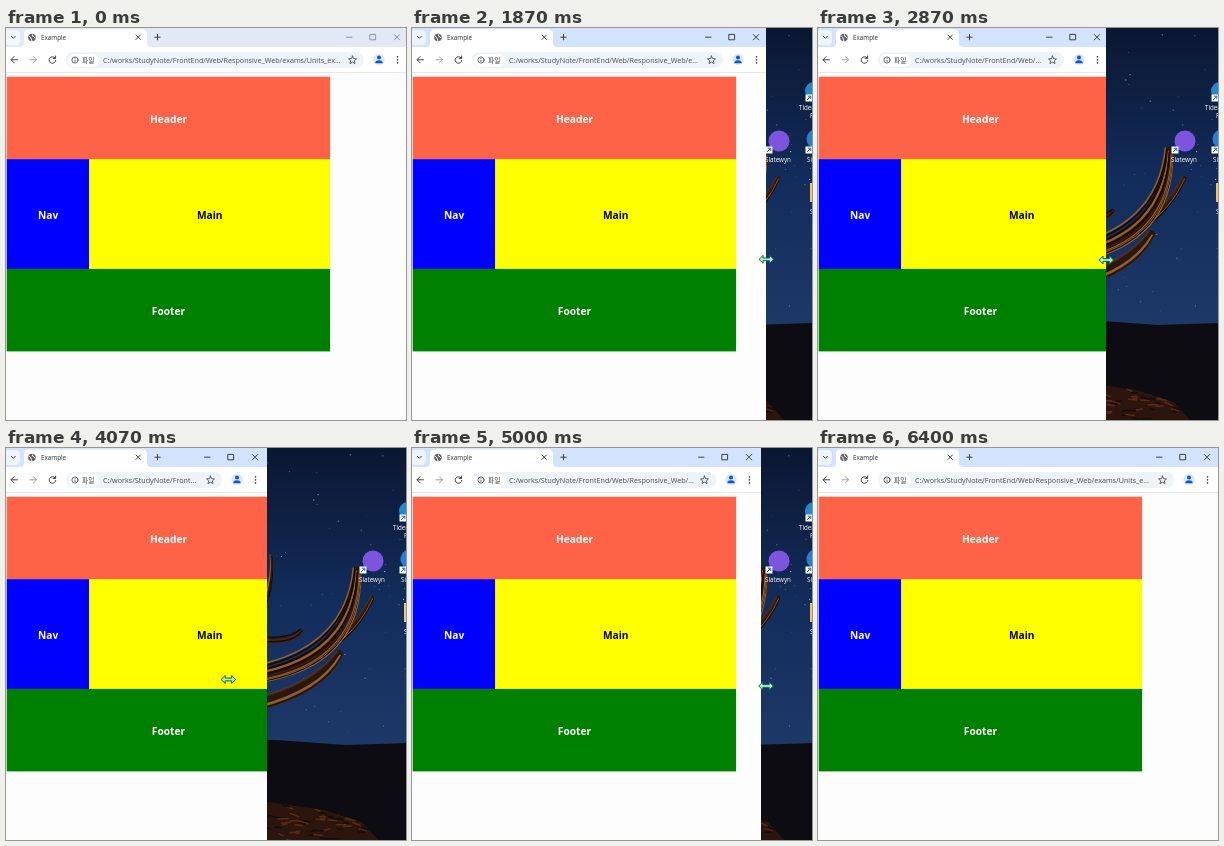
Animation of 400x392 px, one loop 7 s. Source, as an HTML page:

```html
<!DOCTYPE html>
<html lang="en">
<head>
<meta charset="utf-8">
<title>Window resize</title>
<style>
  html, body { margin: 0; width: 100%; height: 100%; overflow: hidden; background: #fefdfe; }
  body { position: relative; font-family: "Open Sans", "Noto Sans", sans-serif; }
  svg, div { position: absolute; }
  svg { left: 0; top: 0; overflow: hidden; }
  #win { left: 0; top: 0; height: 392px; overflow: hidden; background: #fefdfe; }
  #bar { left: 0; top: 0; height: 45px; }
  .strip { left: 0; right: 0; top: 0; height: 19px; background: #d3e3fd; }
  .idle .strip { background: #e2e9f5; }
  .idle .ctl { opacity: .5; }
  .tools { left: 0; right: 0; top: 19px; height: 26px; background: #fff; border-bottom: 1px solid #e3e7ee; box-sizing: border-box; }
  .field { left: 60px; right: 45px; top: 24px; height: 16px; border-radius: 8px; background: #eef2f9; }
  .chip { left: 62px; top: 25.5px; width: 31px; height: 13px; border-radius: 6.5px; background: #fff; }
  .file { left: 76px; top: 27px; font: 6.7px/10px "Noto Sans CJK KR", "Noto Sans CJK", sans-serif; color: #333; white-space: nowrap; }
  .url { left: 97px; right: 67px; top: 26.5px; font-size: 7.2px; line-height: 11px; color: #4a4d52; white-space: nowrap; overflow: hidden; text-overflow: ellipsis; }
  .tab { left: 35px; top: 4.5px; font-size: 6.3px; line-height: 10px; color: #2b2d31; }
  .right { left: auto; right: 0; }
  .page { font-weight: 700; font-size: 10.2px; text-anchor: middle; }
  .label { font-size: 6.25px; fill: #fff; }
  .line { fill: none; stroke: #3c4043; stroke-linecap: round; stroke-linejoin: round; }
</style>
</head>
<body>
<svg width="400" height="392">
  <defs>
    <linearGradient id="sky" x2="0" y2="1">
      <stop offset="0" stop-color="#0b1731"/>
      <stop offset=".5" stop-color="#122c5b"/>
      <stop offset="1" stop-color="#1d3967"/>
    </linearGradient>
    <g id="link">
      <rect width="7" height="7" fill="#fff"/>
      <path d="M1.5 5.5 5 2M2.4 1.7H5.3V4.6" fill="none" stroke="#2467b8"/>
    </g>
    <clipPath id="rock"><path d="M200 354H262L318 362 356 374 372 392H200Z"/></clipPath>
  </defs>
  <rect width="400" height="300" fill="url(#sky)"/>
  <g id="stars" fill="#c9d8f2"></g>
  <path d="M200 292H270L340 297 400 295V392H200Z" fill="#0d0c12"/>
  <g id="ground" clip-path="url(#rock)"><rect y="350" width="400" height="42" fill="#2c150d"/></g>
  <g id="tree" fill="none" stroke-linecap="round"></g>
  <circle cx="367" cy="113" r="10.5" fill="#7d55dc"/>
  <circle cx="402" cy="63" r="9" fill="#2489ca"/>
  <circle cx="404" cy="111" r="9.5" fill="#2c7fd0"/>
  <rect x="398" y="155" width="18" height="19" fill="#f0c46c"/>
  <use href="#link" x="353.5" y="118.5"/>
  <use href="#link" x="393.5" y="66.5"/>
  <use href="#link" x="393.5" y="118.5"/>
  <g class="label">
    <text x="353" y="133.5">Slatewyn</text>
    <text x="387" y="81.5">Tidemark</text>
    <text x="398" y="90">Pen</text>
    <text x="395" y="133.5">Sill</text>
    <text x="398" y="185.5">Sets</text>
  </g>
</svg>

<div id="win">
  <svg class="page" width="400" height="392">
    <rect x=".7" y="48.7" width="323.4" height="83" fill="tomato"/>
    <rect x=".7" y="131.2" width="83" height="110" fill="blue"/>
    <rect x="83.1" y="131.2" width="241" height="110" fill="yellow"/>
    <rect x=".7" y="240.9" width="323.4" height="82.5" fill="green"/>
    <g fill="#fff">
      <text x="162.5" y="94.5">Header</text>
      <text x="42.2" y="190.5">Nav</text>
      <text x="203.7" y="190.5" fill="#000">Main</text>
      <text x="162.5" y="286.5">Footer</text>
    </g>
  </svg>
  <div id="bar">
    <div class="strip"></div>
    <div class="tools"></div>
    <div class="field"></div>
    <div class="chip"></div>
    <svg width="170" height="45">
      <rect x="-2" y="2" width="16" height="15" rx="4.5" fill="#fff" opacity=".6"/>
      <path d="M14 19Q18 19 18 15V6Q18 1.5 22.5 1.5H136.5Q141 1.5 141 6V15Q141 19 145 19Z" fill="#fff"/>
      <circle cx="26" cy="9.5" r="3.8" fill="#5f6368"/>
      <path d="M23.2 8.2Q25 9 25.4 11.2L26 13M26.4 6.4Q26 8.6 28 8.8L29.2 10.4" fill="none" stroke="#fff"/>
      <g class="line">
        <path d="M5.3 8.3 7.3 10.3 9.3 8.3"/>
        <path d="M130 7 134.4 11.4M134.4 7 130 11.4M148.8 9.2H154.2M151.5 6.5V11.9"/>
        <path d="M11.5 31.8H5.2M8.2 28.6 5 31.8 8.2 35"/>
        <path d="M24 31.8H30.3M27.3 28.6 30.5 31.8 27.3 35" stroke="#9a9da1"/>
        <path d="M49 29.8A3.3 3.3 0 1 0 49.8 32.4M49.6 28V30.4H47.2"/>
        <circle cx="69" cy="32" r="3.1" stroke-width=".8"/>
        <path d="M69 32V33.6M69 30.4V30.5" stroke-width=".8"/>
      </g>
    </svg>
    <div class="tab">Example</div>
    <div class="file">파일</div>
    <div class="url">C:/works/StudyNote/FrontEnd/Web/Responsive_Web/exams/Units_exam.html</div>
    <svg class="right" width="70" height="45">
      <g class="line ctl">
        <path d="M7.5 9.2H13"/>
        <rect x="31.2" y="6.4" width="5.4" height="5.4"/>
        <path d="M55.3 6.5 60.7 11.9M60.7 6.5 55.3 11.9"/>
      </g>
      <path class="line" stroke-width=".8" d="M13.5 28 14.6 30.7 17.5 30.9 15.3 32.8 16 35.6 13.5 34.1 11 35.6 11.7 32.8 9.5 30.9 12.4 30.7Z"/>
      <circle cx="40" cy="31.5" r="5.6" fill="#d9e6fc"/>
      <g fill="#0b57d0">
        <circle cx="40" cy="29.4" r="2"/>
        <path d="M36.4 35.2V34Q37 32.2 40 32.2T43.6 34V35.2Z"/>
      </g>
      <path class="line" d="M58.5 28.8V35" stroke-width="1.7" stroke-dasharray="0 3"/>
    </svg>
  </div>
</div>

<svg width="400" height="392">
  <path id="cursor" d="M-7.3 0-3.2-4V-1.4H3.2V-4L7.3 0 3.2 4V1.4H-3.2V4Z" fill="#a9efcb" stroke="#176349" stroke-linejoin="round"/>
</svg>

<script>
  const LOOP = 7000, FPS = 15, MIN_WIDTH = 261;
  const $ = id => document.getElementById(id);

  let seed = 11;
  const rand = (a, b) => a + (b - a) * (seed = seed * 16807 % 2147483647) / 2147483647;

  function add(parent, tag, attrs) {
    const el = document.createElementNS("http://www.w3.org/2000/svg", tag);
    for (const name in attrs) el.setAttribute(name, attrs[name]);
    $(parent).append(el);
  }

  for (let i = 0; i < 60; i++) {
    add("stars", "circle", { cx: rand(255, 400), cy: rand(0, 285), r: rand(.25, .7), opacity: rand(.3, .8) });
  }

  const woods = ["#150b08", "#2b170e", "#4d2b16", "#95602f"];
  const wood = () => woods[Math.floor(rand(0, woods.length))];

  // A branch is a dark core with loose fibres along one curve.
  function branch(x, y, cx, cy, ex, ey, size) {
    const path = (a, b) => `M${x + a / 2} ${y + b / 2}Q${cx + a} ${cy + b} ${ex + a} ${ey + b}`;
    add("tree", "path", { d: path(0, 0), stroke: woods[1], "stroke-width": size * .7 });
    for (let i = 0; i < size * 1.5; i++) {
      const off = rand(-size, size) / 2;
      add("tree", "path", { d: path(off, off + rand(-1, 1)), stroke: wood(), "stroke-width": rand(.8, 1.8) });
    }
  }
  branch(265, 108, 268, 130, 258, 160, 3);
  branch(295, 183, 286, 194, 255, 192, 6);
  branch(366, 150, 345, 195, 290, 216, 6);
  branch(351, 124, 347, 208, 255, 226, 15);
  branch(333, 206, 312, 240, 250, 256, 11);

  for (let i = 0; i < 70; i++) {
    const x = rand(250, 370), y = rand(354, 392);
    add("ground", "path", { d: `M${x} ${y}l${rand(4, 12)} ${rand(-2, 4)}`, stroke: i % 2 ? "#5a2c17" : "#160b09", "stroke-width": 1.5 });
  }

  // Pointer drag: [ms, x, y], linear in between.
  const drag = [[0, 405, 229], [530, 405, 229], [1330, 386, 230], [2330, 327, 232.5], [2870, 288, 232],
    [3600, 213, 232], [4000, 213, 231], [5000, 354, 238], [6200, 403, 236.5], [LOOP, 403, 236.5]];

  function pointer(t) {
    t = Math.max(t, 0);
    const i = drag.findIndex(k => k[0] > t);
    const [t0, x0, y0] = drag[i - 1], [t1, x1, y1] = drag[i];
    const p = (t - t0) / (t1 - t0);
    return [x0 + (x1 - x0) * p, y0 + (y1 - y0) * p];
  }

  // The edge trails the pointer; the toolbar is late to shrink.
  const edge = t => Math.max(MIN_WIDTH, pointer(t - 20)[0] - 2);
  const layout = t => Math.max(edge(t), edge(t - 40));

  function draw(now) {
    const t = Math.floor((now % LOOP + 4) * FPS / 1000) * 1000 / FPS;
    $("win").style.width = edge(t) + "px";
    $("bar").style.width = layout(t) + "px";
    $("win").classList.toggle("idle", t < 530);
    $("cursor").setAttribute("transform", `translate(${pointer(t)})`);
    $("cursor").setAttribute("opacity", t > 530 && t < 6390 ? 1 : 0);
  }

  const start = performance.now();
  function tick() {
    draw(Math.max(0, performance.now() - start) % LOOP);
    requestAnimationFrame(tick);
  }
  tick();
</script>
</body>
</html>
```
